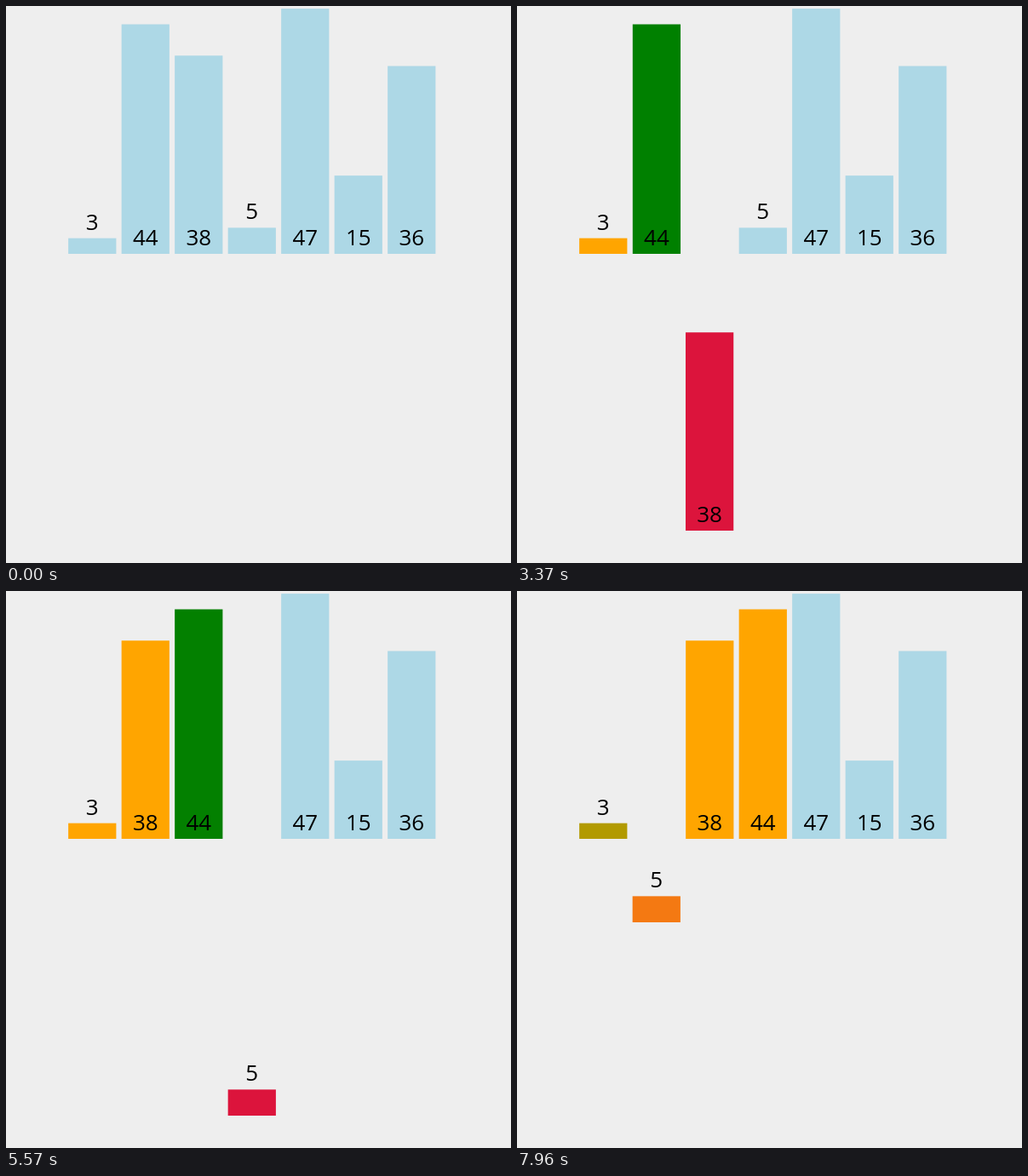
These frames come from a looping animation (593 px wide and 654 px high, 8 s). An HTML page:

```html
<!DOCTYPE html>
<html lang="en">
<head>
<meta charset="utf-8">
<title>Insertion sort</title>
<style>
  html, body { margin: 0; width: 100%; height: 100%; overflow: hidden; background: #eee; }
  svg { display: block; width: 593px; height: 654px; }
  text { font: 26px "Open Sans", "Noto Sans", sans-serif; text-anchor: middle; fill: #000; }
</style>
</head>
<body>
<svg id="stage" viewBox="0 0 593 654"></svg>
<script>
const NS = "http://www.w3.org/2000/svg";
const LOOP = 8000, START = 354, PERIOD = 497, MOVE = 250;
const TICK = 77.9, TICK_OFFSET = 7.6;
const LEFT = 73.15, PITCH = 62.5, WIDTH = 56.25, BASE = 291, UNIT = 6.125, DROP = 325;
const BLUE = [173, 216, 230], ORANGE = [255, 165, 0], GREEN = [0, 128, 0], RED = [220, 20, 60];
const values = [3, 44, 38, 5, 47, 15, 36];

// Runs the sort; each step lists the bars that change and their new pose.
function sortSteps() {
  const pose = (bar, slot, row, color) => ({ bar, slot, row, color });
  const order = [...values.keys()];
  const steps = [[pose(0, 0, 0, ORANGE)]];
  for (let i = 1; i < order.length; i++) {
    const key = order[i];
    let slot = i, done = [];
    steps.push([pose(key, slot, 1, RED)]);
    while (slot > 0) {
      const other = order[slot - 1];
      steps.push([...done, pose(other, slot - 1, 0, GREEN)]);
      if (values[other] <= values[key]) {
        done = [pose(other, slot - 1, 0, ORANGE)];
        break;
      }
      steps.push([pose(other, slot, 0, GREEN), pose(key, slot - 1, 1, RED)]);
      done = [pose(other, slot, 0, ORANGE)];
      order[slot--] = other;
    }
    order[slot] = key;
    steps.push([...done, pose(key, slot, 0, ORANGE)]);
  }
  return steps;
}

const steps = sortSteps();
const stage = document.getElementById("stage");

function add(tag, attrs, parent) {
  const el = document.createElementNS(NS, tag);
  for (const key in attrs) el.setAttribute(key, attrs[key]);
  return parent.appendChild(el);
}

const bars = values.map(value => {
  const height = value * UNIT;
  const group = add("g", {}, stage);
  const rect = add("rect", { y: BASE - height, width: WIDTH, height }, group);
  const y = (height < 40 ? BASE - height : BASE) - 10;
  add("text", { x: WIDTH / 2, y }, group).textContent = value;
  return { group, rect };
});

const mix = (a, b, p) => a + (b - a) * p;
const cubicInOut = t => t < 0.5 ? 4 * t ** 3 : 1 - 4 * (1 - t) ** 3;

// The picture advances in ticks and holds between them.
const hold = time => TICK_OFFSET + Math.floor((time - TICK_OFFSET) / TICK) * TICK;

function render(time) {
  const poses = values.map((_, slot) => ({ slot, row: 0, color: BLUE }));
  const now = hold(time) - START;
  for (let k = 0; k < steps.length && now > k * PERIOD; k++) {
    const p = cubicInOut(Math.min(1, (now - k * PERIOD) / MOVE));
    for (const { bar, slot, row, color } of steps[k]) {
      const from = poses[bar];
      poses[bar] = {
        slot: mix(from.slot, slot, p),
        row: mix(from.row, row, p),
        color: from.color.map((c, i) => mix(c, color[i], p))
      };
    }
  }
  poses.forEach(({ slot, row, color }, i) => {
    const { group, rect } = bars[i];
    group.setAttribute("transform", `translate(${LEFT + slot * PITCH} ${row * DROP})`);
    rect.setAttribute("fill", `rgb(${color.map(Math.round).join(",")})`);
  });
}

const begin = performance.now();
function tick() {
  render((performance.now() - begin) % LOOP);
  requestAnimationFrame(tick);
}
tick();
</script>
</body>
</html>
```
